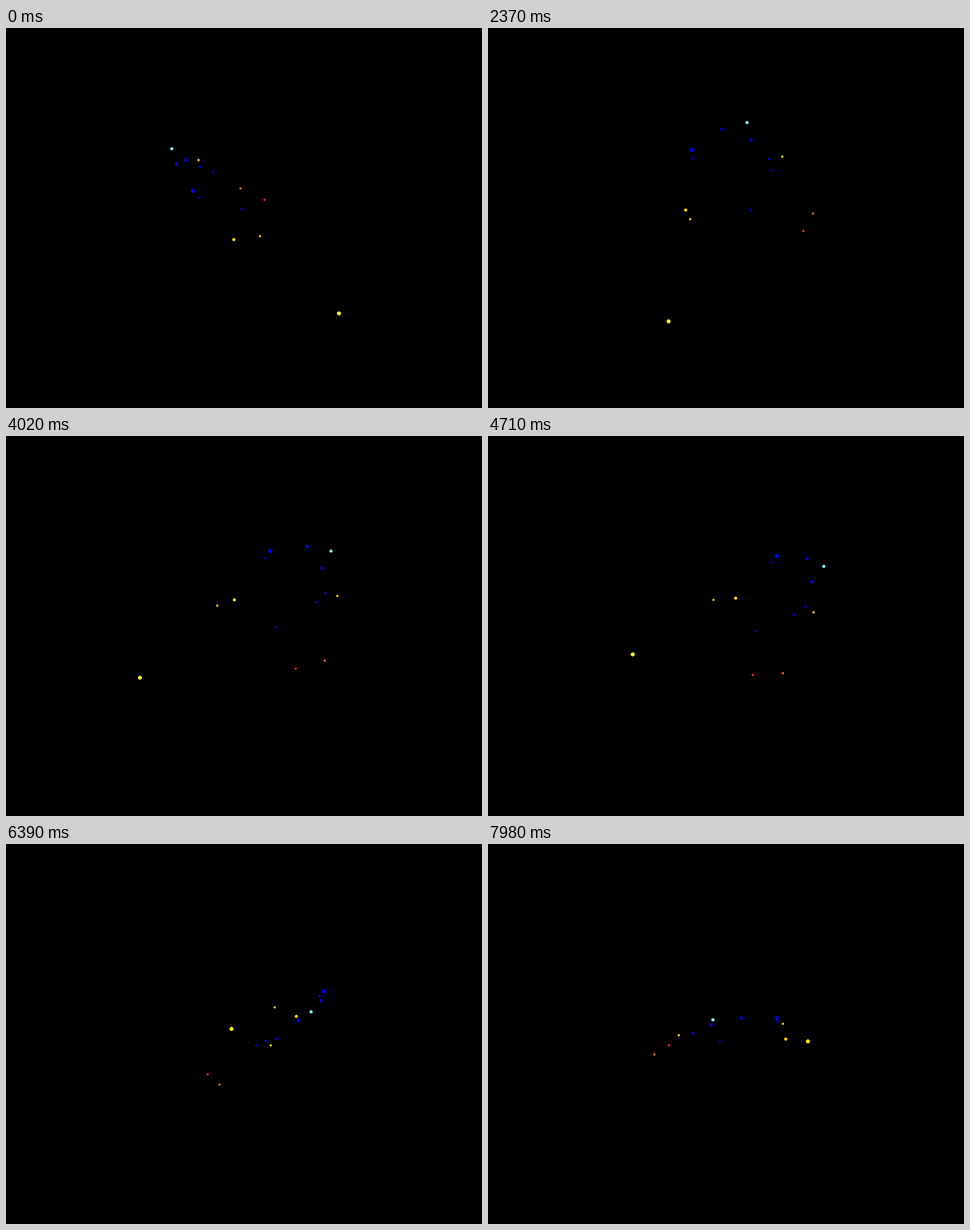
A matplotlib script for the animation above (8000 ms loop, 837 by 669 pixels).

```python
import numpy as np
import matplotlib.pyplot as plt
from matplotlib.animation import FuncAnimation

W, H, DPI = 837, 669, 100
FRAMES, LOOP_MS = 267, 8000
CX, CY = 435.9, 330.9        # screen point the stars turn around
EYE = 2784.5                 # camera distance in pixels
ELEV = np.radians(30)

# right, towards the viewer, up, marker size, colour
STARS = [
    (145.0, 145.0, -108.6, 4, "#ffff1e"),
    (-144.6, -48.6, 108.5, 3, "#7fffff"),
    (-103.8, 60.5, 84.5, 4, "#0000ff"),
    (-134.2, -0.6, 104.0, 3, "#0000ff"),
    (-120.3, -51.0, 85.2, 3, "#0000ff"),
    (-94.7, 62.4, 72.7, 2, "#0000e6"),
    (-96.2, -79.4, 55.9, 2, "#0000e6"),
    (-74.6, -78.9, 44.7, 2, "#0000e6"),
    (-23.6, -30.2, -4.1, 2, "#0000dc"),
    (-35.0, 84.2, 2.4, 3, "#ffd200"),
    (-100.0, -103.9, 56.6, 2, "#ffcd0a"),
    (9.4, 83.0, 8.7, 2, "#ffc30a"),
    (-24.6, -144.8, -24.3, 2, "#ff5a1e"),
    (18.9, -117.8, -33.1, 2, "#ff2814"),
]
RIGHT, NEAR, UP = np.array([s[:3] for s in STARS]).T


def project(degrees):
    """Screen positions after turning the stars about the vertical axis."""
    a = np.radians(degrees)
    x = RIGHT * np.cos(a) - NEAR * np.sin(a)
    y = RIGHT * np.sin(a) + NEAR * np.cos(a)
    depth = y * np.cos(ELEV) + UP * np.sin(ELEV)
    height = UP * np.cos(ELEV) - y * np.sin(ELEV)
    zoom = 1 / (1 - depth / EYE)
    return CX + x * zoom, CY - height * zoom


# the small margin keeps the pixel size from being rounded down
fig = plt.figure(figsize=((W + 0.01) / DPI, (H + 0.01) / DPI), dpi=DPI,
                 facecolor="black")
ax = fig.add_axes([0, 0, 1, 1])
ax.set_xlim(0, W)
ax.set_ylim(H, 0)
ax.axis("off")

dots = [
    ax.plot([], [], "o", ms=size, mew=1, color=color)[0]
    for *_, size, color in STARS
]


def update(i):
    for dot, x, y in zip(dots, *project(i)):
        dot.set_data([x], [y])
    return dots


anim = FuncAnimation(fig, update, frames=FRAMES, interval=LOOP_MS / FRAMES,
                     init_func=lambda: update(0), repeat=True, repeat_delay=0)
plt.show()
```
